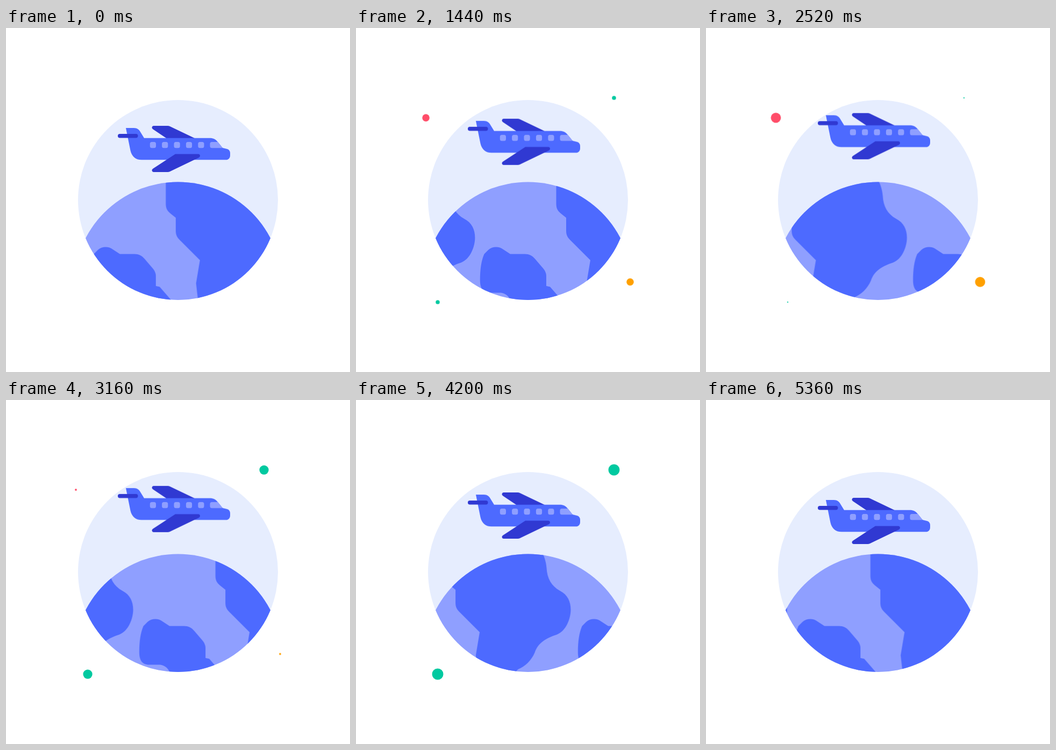
An HTML page for the animation above (5.4 s loop, 640 by 640 pixels).

```html
<!DOCTYPE html>
<html lang="en">
<head>
<meta charset="utf-8">
<title>Flight over the globe</title>
<style>
  html, body { margin: 0; width: 100%; height: 100%; overflow: hidden; background: #fff; }
  svg { display: block; width: 100vw; height: 100vh; }

  .sky { fill: #e6edfe; }
  .sea, .glass { fill: #8f9fff; }
  .land, .body { fill: #4d6aff; }
  .wing { fill: #3039d2; }

  .strip { animation: scroll 5.4s linear infinite; }
  .plane { animation: hover 2.7s cubic-bezier(.333, 0, .667, 1) infinite alternate; }
  .dot {
    transform-box: fill-box;
    transform-origin: center;
    animation: pulse 5.4s cubic-bezier(.333, 0, .667, 1) infinite both;
  }
  .late { animation-delay: .6s; }

  @keyframes scroll { to { transform: translateX(-1158px); } }
  @keyframes hover { to { transform: translateY(-24px); } }
  /* four pulses of 1.2 s, then a 0.6 s rest */
  @keyframes pulse {
    0%, 22.2222%, 44.4444%, 66.6667%, 88.8889%, 100% { transform: scale(0); }
    11.1111%, 33.3333%, 55.5556%, 77.7778% { transform: scale(1); }
  }
</style>
</head>
<body>
<svg viewBox="0 0 640 640">
  <defs>
    <clipPath id="disc"><circle cx="320" cy="320" r="186"/></clipPath>
    <clipPath id="globe"><circle cx="320" cy="480.3" r="193.8"/></clipPath>
    <g id="map">
      <!-- island -->
      <path d="M155.8 469 C155.8 450 158 433 163.5 420.5 L171 413 C179 406 191 406 199 412 L212 420.5
        H239 C247 420.5 253 423.5 258 429.5 L273 447 C277 452 279 456 279 462 V480 L286 481.5 L306 504.5
        L314 514 H217 L210 502 C205 495 199 492.5 192 492.5 H174 C161 492.5 155.8 484 155.8 469 Z"/>
      <!-- continent -->
      <path d="M297.5 280 V327 C297.5 335 300 340 306 345 L316 353 V377 C316 384 318 389 323 394
        L361 432 L353.8 475 L357 503 L362 514 H420 L432.4 501 C445.4 496 457.4 484 463.4 470
        C469.4 452 484.4 443 504.4 436.5 C521.4 430 530.4 407 530.4 390 C530.4 375 524.4 362 510.4 355
        C494.4 346 486.4 332 485.4 312 C484.4 300 480.4 288 475 280 Z"/>
    </g>
  </defs>

  <circle class="sky" cx="320" cy="320" r="186"/>
  <g clip-path="url(#disc)">
    <g clip-path="url(#globe)">
      <rect class="sea" x="120" y="280" width="400" height="240"/>
      <g class="strip land">
        <use href="#map"/>
        <use href="#map" x="384"/>
        <use href="#map" x="770"/>
        <use href="#map" x="1158"/>
      </g>
    </g>
  </g>

  <g class="plane">
    <path class="wing" d="M275 182 H301 Q303 182 305 183 L352 205.5 H299 L273.3 188.3 Q271.3 186.8 271.5 185 Q272 182 275 182 Z"/>
    <path class="body" d="M223 186 H238 C244 186 248 189 251 195 L257 204.8 H379 C386 204.8 390 207 394 212
      L403 223 L411 225 C415 226 417 229 417 233 V237 C417 242 414 245.3 409 245.3 H252
      C241 245.3 234 239 231.5 228 Z"/>
    <rect class="wing" x="208" y="197" width="37.5" height="7.5" rx="3.75"/>
    <g class="glass">
      <rect x="267.8" y="212" width="11.2" height="11.2" rx="3.5"/>
      <rect x="290.1" y="212" width="11.2" height="11.2" rx="3.5"/>
      <rect x="312.5" y="212" width="11.2" height="11.2" rx="3.5"/>
      <rect x="334.9" y="212" width="11.2" height="11.2" rx="3.5"/>
      <rect x="357.3" y="212" width="11.2" height="11.2" rx="3.5"/>
      <path d="M383 212 H394 L403 223.2 H383 Q379.5 223.2 379.5 219.7 V215.5 Q379.5 212 383 212 Z"/>
    </g>
    <path class="wing" d="M315 234.5 H357.5 Q361 234.5 361 238 Q361 240 358.5 241.2 L304.5 267.2 Q303 268 301 268
      H275 Q272 268 271.5 265 Q271.3 263 273.3 261.8 Z"/>
  </g>

  <circle class="dot" cx="480" cy="130" r="10.5" fill="#00c9a0"/>
  <circle class="dot" cx="152" cy="510" r="10.5" fill="#00c9a0"/>
  <circle class="dot late" cx="130" cy="167" r="10.5" fill="#ff4d69"/>
  <circle class="dot late" cx="510" cy="472.5" r="10.5" fill="#ffa000"/>
</svg>
</body>
</html>
```
